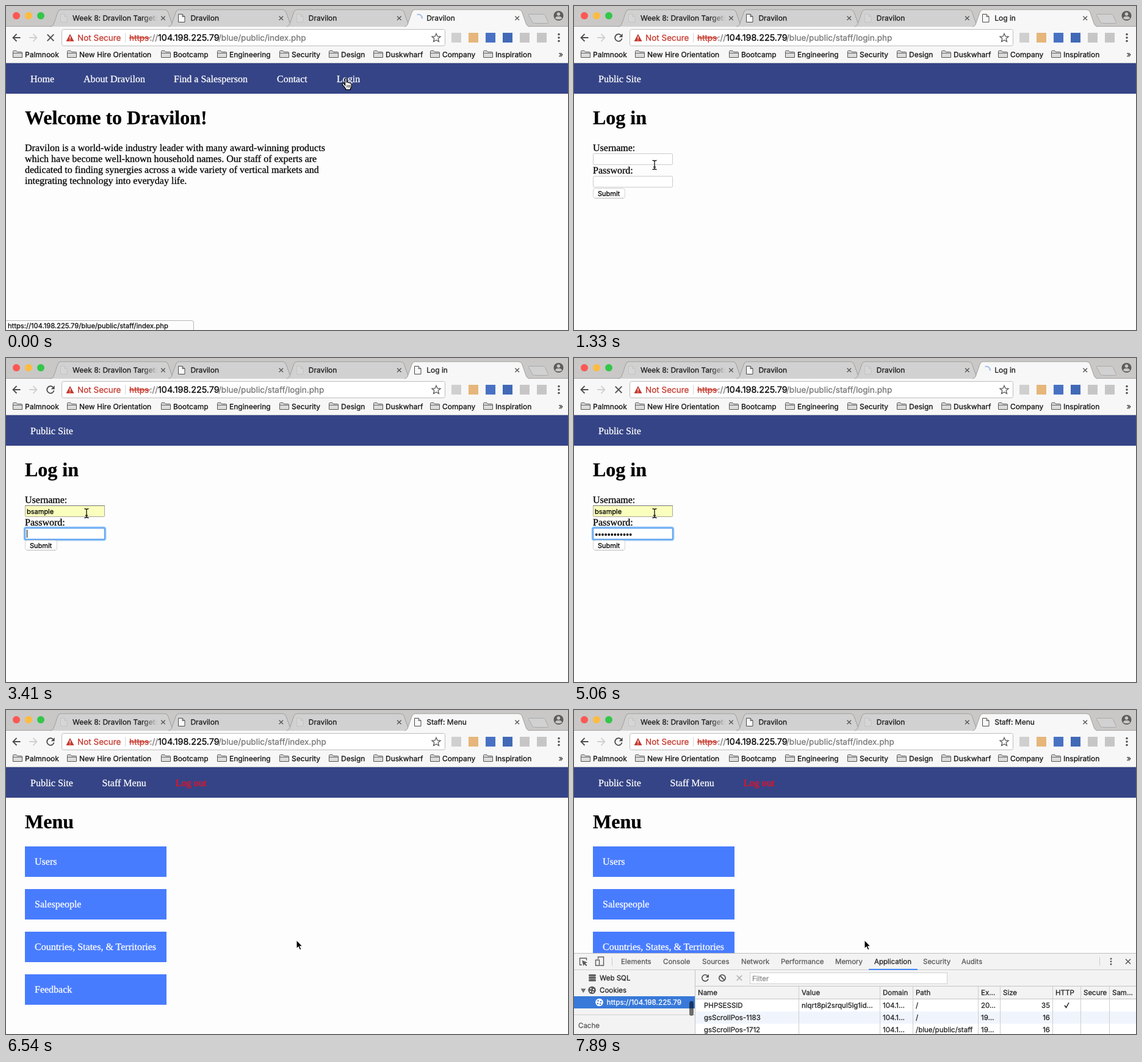
Recreate the animation shown at these times as an HTML page. Size 921 px wide and 532 px high, loop 8 s.

```html
<!DOCTYPE html>
<html lang="en">
<head>
<meta charset="utf-8">
<title>Browser login</title>
<style>
html, body { margin: 0; width: 100%; height: 100%; overflow: hidden; background: #fdfdfd; }
svg { display: block; width: 921px; height: 532px; font-family: Inter, sans-serif; font-feature-settings: "calt" 0; }
text { text-rendering: geometricPrecision; stroke-width: .28px; }
.serif { font-family: "Liberation Serif", serif; }
.sans { font-family: "Liberation Sans", sans-serif; }
</style>
</head>
<body>
<svg id="stage" viewBox="0 0 921 532"></svg>
<script>
const LOOP = 8000;
const stage = document.getElementById('stage');
const HOST = '104.198.225.79';
const COMPANY = 'Dravilon';
const USER = 'bsample';

const rect = (x, y, w, h, fill, extra = '') =>
  `<rect x="${x}" y="${y}" width="${w}" height="${h}" fill="${fill}" ${extra}/>`;
const line = (d, color, width = 1, extra = '') =>
  `<path d="${d}" fill="none" stroke="${color}" stroke-width="${width}" ${extra}/>`;
const shape = (d, fill, extra = '') => `<path d="${d}" fill="${fill}" ${extra}/>`;
const dot = (x, y, r, fill, extra = '') => `<circle cx="${x}" cy="${y}" r="${r}" fill="${fill}" ${extra}/>`;
// A hairline stroke gives the slightly heavy look of smoothed desktop text
const text = (x, y, s, size = 12, fill = '#1c1c1c', extra = '') =>
  `<text x="${x}" y="${y}" font-size="${size}" fill="${fill}" stroke="${fill}" ${extra}>${s}</text>`;
const serif = (x, y, s, fill = '#000') => text(x, y, s, 16, fill, 'class="serif"');
const at = (x, y, body) => `<g transform="translate(${x} ${y})">${body}</g>`;
const cross = (x, y, r, color, width) =>
  line(`M${x - r} ${y - r}l${2 * r} ${2 * r}m0 ${-2 * r}l${-2 * r} ${2 * r}`, color, width);
const outline = color => `stroke="${color}" stroke-width="1"`;

// Last entry of a time-sorted list that has begun
const current = (list, t) => list.filter(([start]) => start <= t).pop();

const STEPS = [0, 150, 300, 450, 5060, 5200, 5350, 5500];

function docIcon(x, color, fill) {
  return shape(`M${x + .5} 13.5h6.5l4 4v9h-10.5zM${x + 7} 13.5v4h4`, fill, outline(color));
}

function tab(i, title, loading, angle) {
  const x = 73 + 193.4 * i, active = i === 3, faint = i % 2 === 0;
  const d = `M${x} 34q4-1 5-4l7-20q1.5-4 5-4h170q4 0 5.5 4l7 20q1 3 5 4`;
  const icon = loading
    ? line('M-2-5.8A6.1 6.1 0 0 1 6.1 1', '#a3bfe6', 2, `transform="translate(${x + 22.5} 20) rotate(${angle})"`)
    : docIcon(Math.round(x + 16), faint ? '#c3c3c3' : '#4c4c4c', faint ? '#d6d6d6' : '#f8f8f8');
  return shape(d, active ? '#f7f7f7' : '#d2d1d1', outline('#9f9e9e')) +
    (active ? rect(x + 3, 33, 199, 2, '#f7f7f7') : '') + icon +
    text(x + 36, 24, title, 12, i ? '#1c1c1c' : 'url(#fade)') +
    cross(x + 184.5, 20, 3.3, '#555', 1.3);
}

const reload = (x, y, s = 1) => `<g transform="translate(${x} ${y}) scale(${s})">` +
  line('M4.2-4A5.8 5.8 0 1 0 5.6 1.6', '#4d4d4d', 1.8) + shape('M6.6-6.8v6h-6z', '#4d4d4d') + '</g>';

function folder(x) {
  return shape(`M${x + .5} 84.5v-10q0-1 1-1h4.5l1.5 2h7q1 0 1 1v8z`, '#dcdcdc', outline('#555')) +
    line(`M${x + 1} 77.5h14`, '#666');
}

const BOOKMARKS = [[31, 'Palmnook'], [120, 'New Hire Orientation'], [274, 'Bootcamp'], [366, 'Engineering'],
  [468, 'Security'], [549, 'Design'], [622, 'Duskwharf'], [715, 'Company'], [802, 'Inspiration']];
const EXTENSIONS = ['#cfcfcf', '#e6b67b', '#4871c4', '#4169b5', '#c6c6c6', '#c6c6c6'];

function chrome(title, path, loading, angle) {
  let s = `<linearGradient id="fade" gradientUnits="userSpaceOnUse" x1="222" x2="248">
    <stop stop-color="#1c1c1c"/><stop offset="1" stop-color="#1c1c1c" stop-opacity="0"/></linearGradient>`;
  s += rect(0, 0, 921, 34, '#c9c8c7') + line('M0 33.5H921', '#a5a4a4');
  s += dot(17, 16, 6, '#fc5753') + dot(37, 16, 6, '#fdbc40') + dot(57, 16, 6, '#33c748');
  s += rect(0, 34, 921, 60, '#f7f7f7') + line('M0 93.5H921', '#c4c4c8');
  [`Week 8: ${COMPANY} Targets`, COMPANY, COMPANY, title].forEach((name, i) => {
    s += tab(i, name, i === 3 && loading, angle);
  });
  s += shape('M857.5 13.5h23q2 0 3 2l5 11q1 2-2 2h-21q-2 0-3-2l-6-11q-1-2 1-2z', '#d2d1d1', outline('#aaa9a9'));
  s += dot(905.5, 16, 8, '#5c5c5c') + dot(905.5, 13.2, 2.7, '#c9c8c7') +
    shape('M900 20.5q0-3.5 5.5-3.5t5.5 3.5q-5.5 3-11 0z', '#c9c8c7');

  s += line('M23.5 52H11.5m6-6l-6 6 6 6', '#4d4d4d', 1.8) + line('M38 52H50.5m-6-6l6 6-6 6', '#d0d0d0', 1.8);
  s += loading ? cross(73, 52, 5.3, '#4d4d4d', 1.9) : reload(73, 52);
  s += rect(91.5, 38.5, 628, 27, '#fff', 'rx="3" stroke="#bdbdbd"');
  s += shape('M105 46l6.5 12h-13z', '#c5392d') + line('M105 50v4m0 1v1.5', '#fff', 1.3);
  s += text(117, 57, 'Not Secure', 13.5, '#c5392d') + line('M195.5 44v16', '#d6d6d6');
  s += text(202, 57, 'https', 13.5, '#c5392d') + line('M202 52.5h34', '#c5392d', 1.3);
  s += text(235.5, 57, '://', 13.5, '#777') + text(249, 57, HOST, 14.4, '#000') + text(348, 57, path, 13.5, '#777');
  s += shape('M705 45.3l2 4.6 5 .4-3.8 3.3 1.2 4.9-4.4-2.6-4.4 2.6 1.2-4.9-3.8-3.3 5-.4z', 'none',
    'stroke="#555" stroke-width="1.3"');
  EXTENSIONS.forEach((color, i) => { s += rect(730 + 28 * i, 44, 16, 16, color); });
  [46.5, 52, 57.5].forEach(y => { s += dot(906, y, 1.8, '#555'); });
  BOOKMARKS.forEach(([x, name]) => { s += folder(x - 20) + text(x, 84, name, 12, '#111'); });
  return s + text(905.5, 83.5, '»', 13, '#444');
}

const heading = s => text(31, 194, s, 32, '#000', 'class="serif" font-weight="bold"');
const nav = items => rect(0, 94, 921, 50, '#354486') +
  items.map(([x, s, color = '#fff']) => serif(x, 125, s, color)).join('');

function welcomePage() {
  const lines = [`${COMPANY} is a world-wide industry leader with many award-winning products`,
    'which have become well-known household names. Our staff of experts are',
    'dedicated to finding synergies across a wide variety of vertical markets and',
    'integrating technology into everyday life.'];
  return nav([[40, 'Home'], [127, `About ${COMPANY}`], [275, 'Find a Salesperson'], [444, 'Contact'], [542, 'Login']]) +
    heading(`Welcome to ${COMPANY}!`) + lines.map((s, i) => serif(31, 238 + 18 * i, s)).join('');
}

function field(y, focus, fill = '#fff') {
  const filled = fill !== '#fff';
  let s = rect(31.5, y + .5, 130, 18, fill, `rx="1" stroke="${filled ? '#a9a99a' : '#cbcbcb'}"`);
  if (filled) s += line(`M31 ${y + .5}h131`, '#777');
  if (focus) s += `<g opacity="${focus}">` +
    rect(30.5, y - .5, 132, 20, 'none', 'rx="2.5" stroke="#a9d0f8" stroke-width="4"') +
    rect(31, y, 131, 19, 'none', 'rx="1.5" stroke="#66a8f2" stroke-width="2"') + '</g>';
  return s;
}
const caret = (x, y) => rect(x, y, 1, 13, '#000');

function loginPage(t) {
  const onUser = t >= 1770 && t < 3260, filled = t >= 2810;
  const onPassword = t < 3260 ? 0 : t < 3410 ? .6 : 1;
  const name = filled ? USER : t >= 2220 ? USER[0] : '';
  let s = nav([[40, 'Public Site']]) + heading('Log in') + serif(31, 238, 'Username:') + serif(31, 275, 'Password:');
  s += field(279, onPassword) + field(242, onUser ? 1 : 0, filled ? '#faffbd' : '#fff');
  s += text(34, 256, name, 11, '#000');
  if (onUser) s += caret(filled ? 79 : name ? 41 : 34, 245);
  if (t >= 2370 && t < 2810) s += rect(31.5, 261.5, 130, 25, '#fff', 'stroke="#8fb3de"') +
    text(40, 279, USER, 13.3, '#000', 'class="sans" font-weight="bold"');
  if (t >= 4160) for (let i = 0; i < 12; i++) s += dot(36.8 + 5.08 * i, 290, 1.9, '#000');
  if (t >= 3260 && t < 3860) s += caret(34, 282);
  if (t >= 4160 && t < 4760) s += caret(95, 282);
  return s + rect(31.5, 299.5, 52, 16, '#fff', 'rx="3.5" stroke="#d2d2d2"') +
    line('M34 315.5h47', '#b8b8b8') + text(39, 312, 'Submit', 11, '#000');
}

function menuPage() {
  const items = ['Users', 'Salespeople', 'Countries, States, &amp; Territories', 'Feedback'];
  return nav([[40, 'Public Site'], [157.5, 'Staff Menu'], [278, 'Log out', '#fa0d1e']]) + heading('Menu') +
    items.map((s, i) => rect(31, 224 + 70 * i, 232, 50, '#487cff') + serif(47, 254 + 70 * i, s, '#fff')).join('');
}

const status = s => shape('M-1 516.5H304q3.5 0 3.5 3.5v13H-1z', '#fcfcfc', outline('#b5b5b5')) +
  text(3, 529, s, 11.2, '#111');

const PANELS = [[77, 'Elements'], [146, 'Console'], [210, 'Sources'], [274, 'Network'], [339, 'Performance'],
  [428, 'Memory'], [492, 'Application'], [572, 'Security'], [635, 'Audits']];
const COLUMNS = [[203, 'Name'], [373, 'Value'], [506, 'Domain'], [560, 'Path'], [667, 'Ex…'], [703, 'Size'],
  [789, 'HTTP'], [835, 'Secure'], [882, 'Sam…']];
const COOKIES = [['PHPSESSID', 'nlqrt8pi2srqul5lg1id…', '/', '20…', 35],
  ['gsScrollPos-1183', '', '/', '19…', 16], ['gsScrollPos-1712', '', '/blue/public/staff', '19…', 16]];

const label = (x, y, s, color = '#222', extra = '') => text(x, y, s, 11.5, color, extra);
const cookie = (x, y, color, hole) => dot(x, y, 6.3, color) +
  [[-2, -2.5], [2.5, -1], [-2.5, 2], [1.5, 3]].map(([dx, dy]) => dot(x + dx, y + dy, 1.2, hole)).join('');

function devtoolsBar() {
  let s = rect(0, 400, 921, 27, '#f3f3f3') + line('M0 426.5H921M62.5 406v14M861.5 406v14', '#cbcbcb');
  s += line('M13 418.5h-3.5v-11h11v3.5', '#5a5a5a', 1.3) + shape('M13 411l9 3.5-3.5 1.5 3 3-1.5 1.5-3-3-1.5 3z', '#5a5a5a');
  s += line('M39.5 409v-3.5h9v14h-6M35.5 410.5h6v9h-6z', '#5a5a5a', 1.4);
  PANELS.forEach(([x, name]) => { s += label(x, 417, name, name === 'Application' ? '#222' : '#5a5a5a'); });
  s += rect(483, 425, 80, 2, '#4285f4');
  [408.5, 413, 417.5].forEach(y => { s += dot(880, y, 1.4, '#5a5a5a'); });
  return s + cross(908, 413, 4, '#5a5a5a', 1.6);
}

function cookieTable() {
  let s = rect(0, 427, 198, 105, '#f3f3f3') + rect(199, 427, 722, 47, '#f3f3f3');
  [436, 440, 444].forEach(y => { s += rect(24, y - 2, 12, 3.4, '#5e5e5e', 'rx="1.5"'); });
  s += label(42, 444, 'Web SQL') + shape('M11 457.5h8.5l-4.25 7z', '#6e6e6e') +
    cookie(29.5, 460, '#5a5a5a', '#f3f3f3') + label(42, 464, 'Cookies');
  s += rect(0, 470, 198, 20, '#3879d9') + cookie(41.5, 480, '#fff', '#3879d9') +
    text(53.5, 484, `https://${HOST}`, 11.8, '#fff');
  s += line('M0 500.5H198', '#d0d0d0') + label(7, 522, 'Cache', '#5a5a5a') +
    rect(189, 478, 7, 24, '#000', 'rx="3.5" opacity=".55"');

  s += reload(215, 440, .9) + dot(243, 440, 5.2, 'none', 'stroke="#5a5a5a" stroke-width="1.8"') +
    line('M239.5 436.5l7 7', '#5a5a5a', 1.8) + cross(271, 440, 4.2, '#b5b5b5', 1.7);
  s += rect(288.5, 431.5, 323, 18, '#fff', 'stroke="#d0d0d0"') + label(292, 444.5, 'Filter', '#8a8a8a');

  COOKIES.forEach(([name, value, path, expires, size], i) => {
    const y = 489 + 20 * i;
    s += rect(199, y - 14, 722, 20, i === 1 ? '#f0f5fd' : '#fff');
    s += label(213, y, name) + label(373, y, value) + label(506, y, '104.1…') + label(560, y, path) +
      label(667, y, expires) + label(780, y, size, '#222', 'text-anchor="end"');
  });
  s += line('M804 485l2.5 3.5 4.5-8', '#222', 1.5);
  COLUMNS.forEach(([x, name], i) => {
    s += label(x, 468, name) + (i ? line(`M${x - 4.5} 454V532`, '#cdcdcd') : '');
  });
  return s + line('M198.5 427V532M199 453.5H921M199 474.5H921', '#c4c4c4');
}

const devtools = t => rect(0, 399, 921, 133, '#fff') + line('M0 399.5H921', '#c0c0c0') +
  (t >= 7740 ? devtoolsBar() : '') + (t >= 7890 ? cookieTable() : '');

const CURSORS = {
  arrow: shape('M.5 0V14.5L3.8 11.5 6 16.6 8.5 15.5 6.3 10.5H10.5z', '#000', 'stroke="#fff" stroke-width="1.1"'),
  hand: '<g transform="scale(1.1)">' +
    shape('M1.5 9V1.5Q1.5 0 2.7 0T4 1.5V6q2-1 2.5.7 2-.7 2.4.8 2-.4 2.1 1.5v3q0 2-1.5 3.5v1.7H2.5v-1.5Q0 13-2.5 9.5-3.5 8-2 7.6t3.5 3z',
      '#fff', 'stroke="#000" stroke-width="1.1"') + line('M4.5 10v4M6.7 10v4M8.7 10v4', '#000', .8) + '</g>',
  beam: line('M-3.5-7.5q3 0 3.5 1.5.5-1.5 3.5-1.5M0-6V6M-3.5 7.5q3 0 3.5-1.5.5 1.5 3.5 1.5M-2 3.5h4', '#111', 1.3)
};
const POINTER = [
  [0, 'hand', 554, 118.5], [450, 'arrow', 554.5, 118.5], [600, 'arrow', 534, 131], [740, 'arrow', 430, 172],
  [890, 'arrow', 300, 222], [1040, 'arrow', 190, 256], [1180, 'beam', 132, 272], [1330, 'beam', 132, 261],
  [1480, 'beam', 132, 255], [6100, 'hand', 137, 256], [6240, 'arrow', 230, 284], [6390, 'arrow', 392, 347],
  [6540, 'arrow', 475.5, 377.5]
];
const VIEWS = [
  [0, COMPANY, '/blue/public/index.php', welcomePage],
  [450, COMPANY, '/blue/public/staff/login.php', loginPage],
  [600, 'Log in', '/blue/public/staff/login.php', loginPage],
  [5650, 'Log in', '/blue/public/staff/index.php', menuPage],
  [5800, 'Staff: Menu', '/blue/public/staff/index.php', menuPage]
];
const STATUS = [
  [0, `https://${HOST}/blue/public/staff/index.php`], [300, `Waiting for ${HOST}...`], [740, ''],
  [5200, `Waiting for ${HOST}...`], [5950, '']
];

function scene(t) {
  const [, title, path, page] = current(VIEWS, t);
  const [, message] = current(STATUS, t);
  const [, kind, x, y] = current(POINTER, t);
  const loading = t < 450 || (t >= 5060 && t < 5650);
  const angle = (STEPS.filter(step => step <= t).length - 1) % 4 * 34;
  return rect(0, 0, 921, 532, '#fdfdfd') + page(t) + chrome(title, path, loading, angle) +
    (message ? status(message) : '') + (t >= 7590 ? devtools(t) : '') + at(x, y, CURSORS[kind]);
}

let shown = '';
function draw() {
  const next = scene(performance.now() % LOOP);
  if (next !== shown) stage.innerHTML = shown = next;
  requestAnimationFrame(draw);
}
draw();
</script>
</body>
</html>
```
